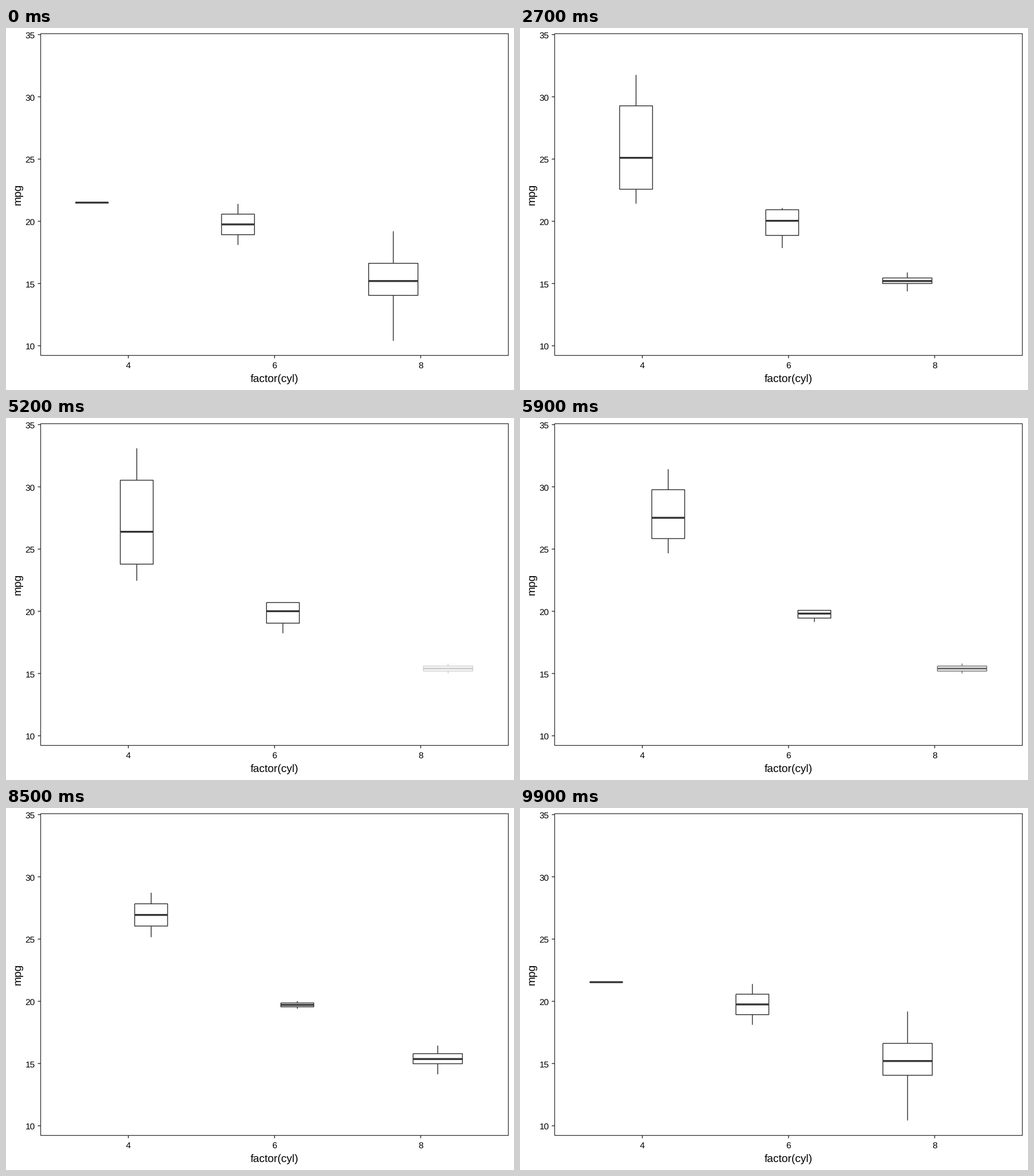
Recreate the animation shown at these times as a matplotlib script. Size 885 by 632 pixels, loop 10000 ms.

```python
import numpy as np
import matplotlib.pyplot as plt
from matplotlib.animation import FuncAnimation

W, H, DPI = 885, 632, 100
LEFT, RIGHT, TOP, BOTTOM = 60.4, 875.2, 9.9, 571.6
INK = 0.2
THIN, THICK = 1.45, 3.3

plt.rcParams["font.family"] = "Liberation Sans"
plt.rcParams["text.hinting"] = "none"

# mpg readings by gear (three states), then by cylinder slot
DATA = [
    {1: [21.5], 2: [21.4, 18.1],
     3: [18.7, 14.3, 16.4, 17.3, 15.2, 10.4, 10.4, 14.7, 15.5, 15.2, 13.3, 19.2]},
    {1: [24.4, 22.8, 32.4, 30.4, 33.9, 27.3, 21.4, 22.8],
     2: [21.0, 21.0, 19.2, 17.8]},
    {1: [26.0, 30.4], 2: [19.7], 3: [15.8, 15.0]},
]
# (first state, start frame, length) of each transition
MOVES = [(0, 11, 22), (1, 45, 22), (2, 79, 21)]


def px(points):
    return points * 72 / DPI


def sx(v):
    return LEFT + (v - 0.4) / 3.2 * (RIGHT - LEFT)


def sy(v):
    return BOTTOM - (v - 9.225) / 25.85 * (BOTTOM - TOP)


def make_box(state, slot):
    """Dodged centre followed by the five-number summary, or None."""
    if slot not in DATA[state]:
        return None
    groups = [g for g in range(3) if slot in DATA[g]]
    n = len(groups)
    centre = slot + 0.75 * ((groups.index(state) + 0.5) / n - 0.5)
    return np.array([centre, *np.percentile(DATA[state][slot], [0, 25, 50, 75, 100])])


BOXES = {(g, c): make_box(g, c) for g in range(3) for c in (1, 2, 3)}
HALF = {c: 0.75 * 0.9 / 2 / sum(c in d for d in DATA) for c in (1, 2, 3)}


def pose(i, slot):
    """Box values and opacity of one slot, or None while it is absent."""
    state, k = 0, 0.0
    for first, start, length in MOVES:
        if i > start:
            state = first
            k = (1 - np.cos(np.pi * min(1, (i - start) / length))) / 2
    a, b = BOXES[state, slot], BOXES[(state + 1) % 3, slot]
    if a is not None and b is not None:
        return a + (b - a) * k, 1
    if a is not None and k < 1:
        flat = a.copy()
        flat[1:] = a[3]
        return a + (flat - a) * k, 1
    if b is not None and k > 0:
        return b, k
    return None


fig = plt.figure(figsize=(W / DPI, H / DPI), dpi=DPI, facecolor="white")
ax = fig.add_axes([0, 0, 1, 1])
ax.set_xlim(0, W)
ax.set_ylim(H, 0)
ax.axis("off")


def line(xs=(), ys=(), width=THIN, color=str(INK), **kw):
    return ax.plot(xs, ys, color=color, lw=px(width), solid_capstyle="butt",
                   solid_joinstyle="round", snap=False, **kw)[0]


def text(x, y, s, size, **kw):
    return ax.text(x, y, s, fontsize=px(size), color="black", **kw)


line([LEFT, RIGHT, RIGHT, LEFT, LEFT], [TOP, TOP, BOTTOM, BOTTOM, TOP], 1.3)
for v in range(10, 36, 5):
    line([LEFT - 5, LEFT], [sy(v)] * 2)
    text(50.8, sy(v) + 6.4, str(v), 15.4, ha="right", va="baseline")
for slot in (1, 2, 3):
    line([sx(slot)] * 2, [BOTTOM, BOTTOM + 5])
    text(sx(slot), 593.6, str(2 * slot + 2), 15.4, ha="center", va="baseline")
text(467.8, 618.2, "factor(cyl)", 19.2, ha="center", va="baseline")
text(25.2, 290.5, "mpg", 19.2, ha="right", va="center", rotation=90).set_position((29.8, 290.5))

parts = {c: [line(), line(), line(), line(width=THICK)] for c in (1, 2, 3)}


def draw(i):
    for slot, lines in parts.items():
        now = pose(i, slot)
        for ln in lines:
            ln.set_visible(now is not None)
        if now is None:
            continue
        (x, *values), alpha = now
        lo, q1, mid, q3, hi = map(sy, values)
        x0, x1, x = sx(x - HALF[slot]), sx(x + HALF[slot]), sx(x)
        paths = [([x, x], [hi, q3]), ([x, x], [q1, lo]),
                 ([x0, x1, x1, x0, x0], [q3, q3, q1, q1, q3]),
                 ([x0, x1], [mid, mid])]
        for ln, path in zip(lines, paths):
            ln.set_data(*path)
            ln.set_color(str(1 - (1 - INK) * alpha))
    return [ln for lines in parts.values() for ln in lines]


anim = FuncAnimation(fig, draw, frames=100, interval=100, repeat=True,
                     repeat_delay=0, blit=False)
plt.show()
```
